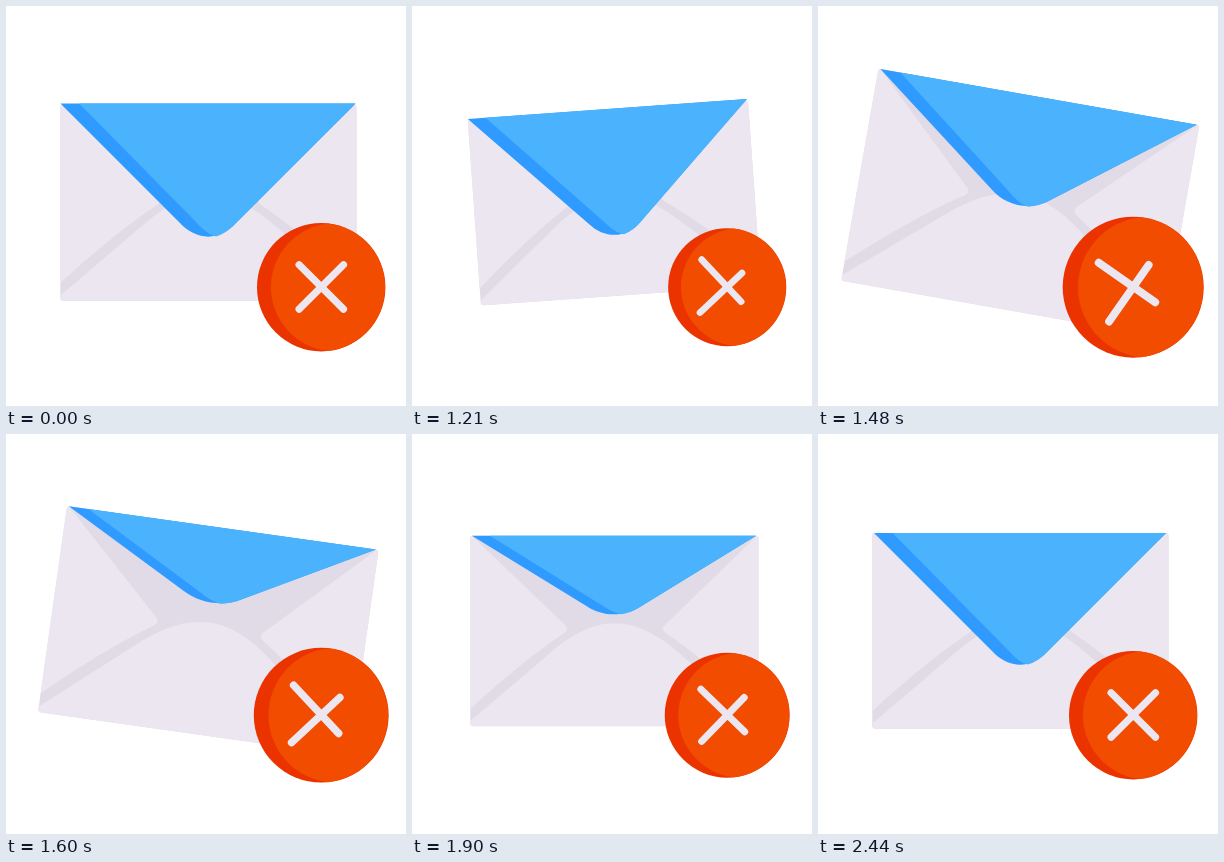
Animation, 400 px wide and 400 px high, one loop 2.47 s. Source, as an HTML page:

```html
<!DOCTYPE html>
<html lang="en">
<head>
<meta charset="utf-8">
<title>Mail rejected</title>
<style>
  html, body { margin: 0; width: 100%; height: 100%; overflow: hidden; background: #fff; }
  svg { display: block; width: 100vw; height: 100vh; }
</style>
</head>
<body>
<svg viewBox="0 0 400 400">
  <g id="mail">
    <rect x="54.3" y="99" width="296.2" height="195.8" rx="3" fill="#e0dbe6"/>
    <g fill="#ebe6ef">
      <path d="M54.3 101Q54.3 99 56 99L152 191Q156.5 195 151 199Q110 226 54.3 277Z"/>
      <path d="M350.5 101Q350.5 99 349 99L254 191Q249.5 195 255 199Q295 226 350.5 277Z"/>
      <path d="M54.3 289.5L144 213C166 196 184 189 202.3 189S239 196 261 213L350.5 289.5V292Q350.5 294.8 347.5 294.8H57.3Q54.3 294.8 54.3 292Z"/>
    </g>
    <g id="flap">
      <path fill="#2f9aff" d="M56 99L174 217C190 234.5 213 235.500 229 218L348 99Z"/>
      <path fill="#4bb3fd" d="M74.500 99L187 213C194 220 200 228 210 230.600Q220 227.500 229 218L348 99Z"/>
    </g>
  </g>
  <g id="badge">
    <circle cx="315.2" cy="281.2" r="64.2" fill="#eb3300"/>
    <path fill="#f24c00" d="M322 217.4A64.2 64.2 0 0 0 322 345A64.2 64.2 0 0 0 322 217.4Z"/>
    <g id="cross" stroke="#ebe6ef" stroke-width="7.2" stroke-linecap="round">
      <path id="armA" d="M-22.2 -22.2L22.2 22.2"/>
      <path id="armB" d="M-22.2 22.2L22.2 -22.2"/>
    </g>
  </g>
</svg>
<script>
const LOOP = 2470, START = 1030, STEP = 30, OPEN = 1300;
const { sin, cos, sqrt, max, min, floor, PI } = Math;

function ease(t, from, to) {
  const x = min(1, max(0, (t - from) / (to - from)));
  return x * x * (3 - 2 * x);
}

// Eases a value through moves of [from time, to time, value].
const through = (t, value, ...moves) =>
  moves.reduce((v, [a, b, goal]) => v + (goal - v) * ease(t, a, b), value);

// Shrink, swell, and settle; the badge lags a little behind the mail.
const pulse = (t, lag, drop) => through(t, 1,
  [960 + lag, 1095 + lag, .9], [1095 + lag, 1455 + lag, 1.1],
  [drop, 1800, .935], [1800, 1980, 1]);

const mailTurn = t => through(t, 0, [960, 1100, -10], [1100, 1405, 10], [1540, 1750, 0]);
const crossTurn = t => through(t, 0, [1010, 1130, 12], [1130, 1350, -22], [1360, 1600, 2],
  [1600, 1750, -2], [1800, 1980, 0]);
const flapHeight = t => through(t, 1, [OPEN, 1680, .48], [1700, 2300, 1]);

// The arms of the cross swing back and forth along their own lines.
function armSlide(t) {
  const fade = sqrt(max(0, sin(PI * min(1, (t - START) / 930))));
  return 14.4 * fade * cos(2 * PI * (t - 1360) / 362);
}

const put = (id, value) => document.getElementById(id).setAttribute('transform', value);
const around = (x, y, turn, sx, sy = sx) =>
  `translate(${x} ${y}) rotate(${turn}) scale(${sx} ${sy}) translate(${-x} ${-y})`;

function draw(time) {
  let t = time % LOOP;
  const moving = t >= START;
  if (moving) t = START + floor((t - START) / STEP) * STEP;

  put('mail', around(202.4, 196.2, moving ? mailTurn(t) : 0, moving ? pulse(t, 0, 1510) : 1));
  put('badge', around(315.2, 281.2, 0, moving ? pulse(t, 45, 1485) : 1));

  // Until it opens, the flap covers the top edge completely.
  put('flap', t < OPEN ? around(202.2, 231, 0, 1.0105) : around(202.2, 99, 0, 1, flapHeight(t)));

  const s = moving ? armSlide(t) * Math.SQRT1_2 : 0;
  put('cross', `translate(315.3 280.9) rotate(${moving ? crossTurn(t) : 0})`);
  put('armA', `translate(${s} ${s})`);
  put('armB', `translate(${s} ${-s})`);
}

const begin = performance.now();
function tick() {
  draw(performance.now() - begin);
  requestAnimationFrame(tick);
}
tick();
</script>
</body>
</html>
```
